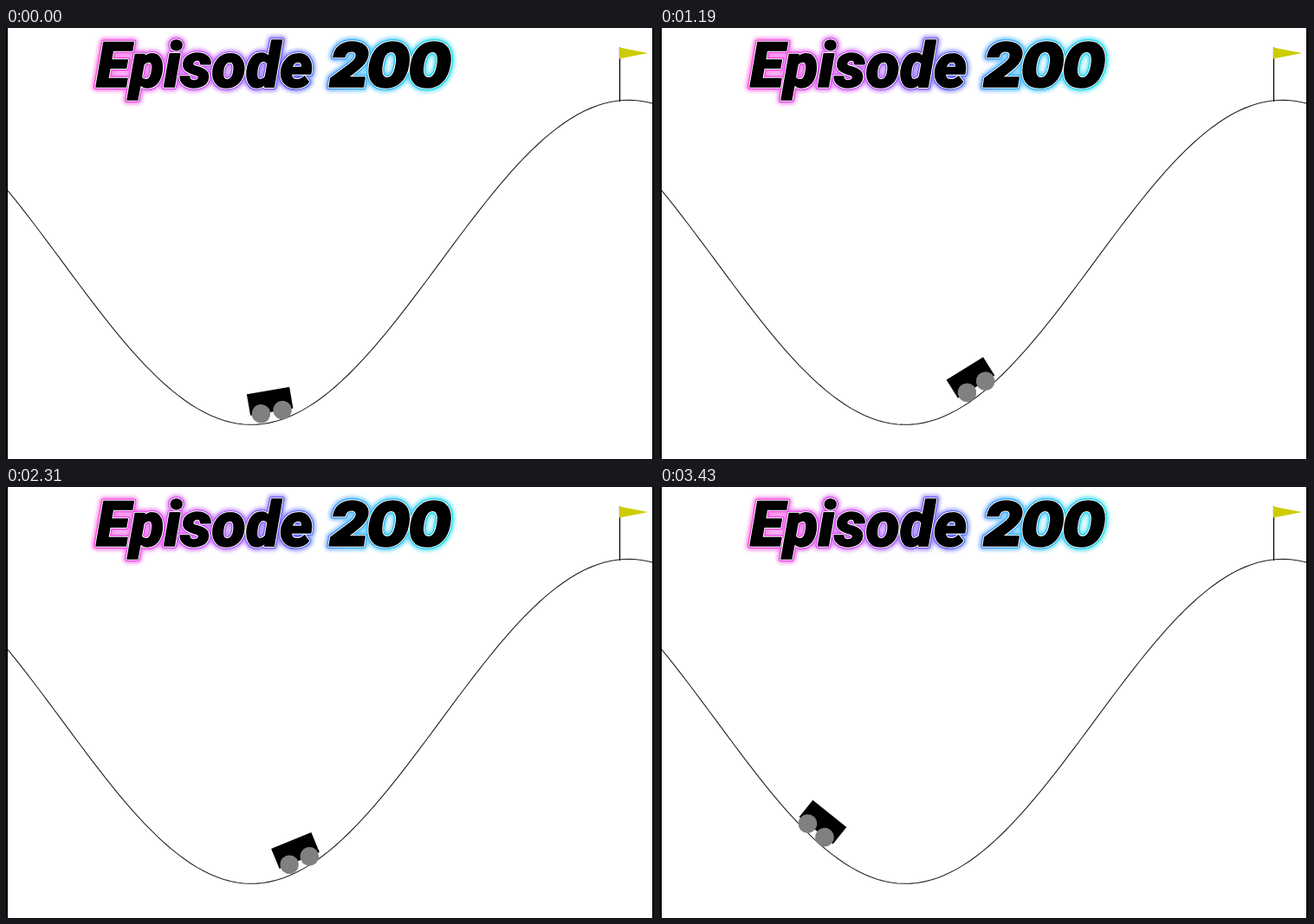
An HTML page that plays this animation: 748x498 px, repeating every 3500 ms.

```html
<!DOCTYPE html>
<html lang="en">
<head>
<meta charset="utf-8">
<title>Episode 200</title>
<style>
  html, body { margin: 0; width: 100%; height: 100%; overflow: hidden; background: #fff; }
  svg { display: block; width: 748px; height: 498px; }
  .title { stroke-linejoin: round; }
  .word { font: italic 900 72px Roboto, sans-serif; }
  .num { font: italic 900 70px Inter, sans-serif; letter-spacing: -2px; }
</style>
</head>
<body>
<svg viewBox="0 0 748 498">
  <defs>
    <linearGradient id="neon" gradientUnits="userSpaceOnUse" x1="104" y1="0" x2="512" y2="0">
      <stop offset="0" stop-color="#ff3fd8"/>
      <stop offset=".3" stop-color="#c94dff"/>
      <stop offset=".56" stop-color="#5a5cff"/>
      <stop offset=".72" stop-color="#2fa8ff"/>
      <stop offset="1" stop-color="#12dcea"/>
    </linearGradient>
    <filter id="blur" filterUnits="userSpaceOnUse" x="80" y="0" width="460" height="100">
      <feGaussianBlur stdDeviation="2"/>
    </filter>
    <g id="label" class="title">
      <text class="word" x="104" y="67.5">Episode</text>
      <text class="num" x="373" y="67.5">200</text>
    </g>
  </defs>

  <path id="track" fill="none" stroke="#222" stroke-width="1.1"/>
  <path d="M708.5 85V22.5" stroke="#000" stroke-width="1.25"/>
  <path d="M708 22.5V35.5L741 29Z" fill="#cccc00"/>

  <use href="#label" fill="none" stroke="url(#neon)" stroke-width="10" opacity=".65" filter="url(#blur)"/>
  <use href="#label" fill="none" stroke="url(#neon)" stroke-width="6"/>
  <use href="#label" fill="none" stroke="#fff" stroke-width="3.6"/>
  <use href="#label" fill="#000" stroke="#000" stroke-width="1.6"/>

  <g id="car">
    <rect x="-25" y="-25" width="50" height="25"/>
    <circle cx="-12.5" r="10.8" fill="#808080"/>
    <circle cx="12.5" r="10.8" fill="#808080"/>
  </g>

  <path d="M0 0H2V498H0ZM746 0H748V498H746Z"/>
</svg>
<script>
const STEP = 70, STEPS = 50, LEFT = 2, WIDTH = 748.5, HEIGHT = 1250 / 3;

// Turning points of the swing: [step, x]
const turns = [
  [-2.15, 116], [2, 477], [6, 62], [9, 334], [13, 134], [18.15, 396],
  [23.45, 170], [28, 477], [31, 85], [34.18, 449], [36, 134],
  [38.4, 420], [41, 20], [44.1, 527], [47.85, 116], [52, 477]
];

const toPos = x => (x - LEFT) / WIDTH * 1.8 - 1.2;
const hillY = x => 500 - HEIGHT * (0.55 + 0.45 * Math.sin(3 * toPos(x)));

function carX(step) {
  const i = turns.findIndex(p => p[0] > step);
  const [t0, x0] = turns[i - 1], [t1, x1] = turns[i];
  const u = (step - t0) / (t1 - t0);
  return x0 + (x1 - x0) * (1 - Math.cos(Math.PI * u)) / 2;
}

const points = Array.from({ length: 100 }, (_, i) => {
  const x = LEFT + i * WIDTH / 99;
  return x.toFixed(2) + " " + hillY(x).toFixed(2);
});
document.getElementById("track").setAttribute("d", "M" + points.join("L"));

const car = document.getElementById("car");

function draw(step) {
  const x = carX(step);
  const tilt = -Math.cos(3 * toPos(x)) * 180 / Math.PI;
  car.setAttribute("transform", `translate(${x} ${hillY(x) - 12}) rotate(${tilt})`);
}

const start = performance.now();
function tick() {
  const time = Math.max(0, performance.now() - start);
  draw(Math.floor(time / STEP) % STEPS);
  requestAnimationFrame(tick);
}
tick();
</script>
</body>
</html>
```
